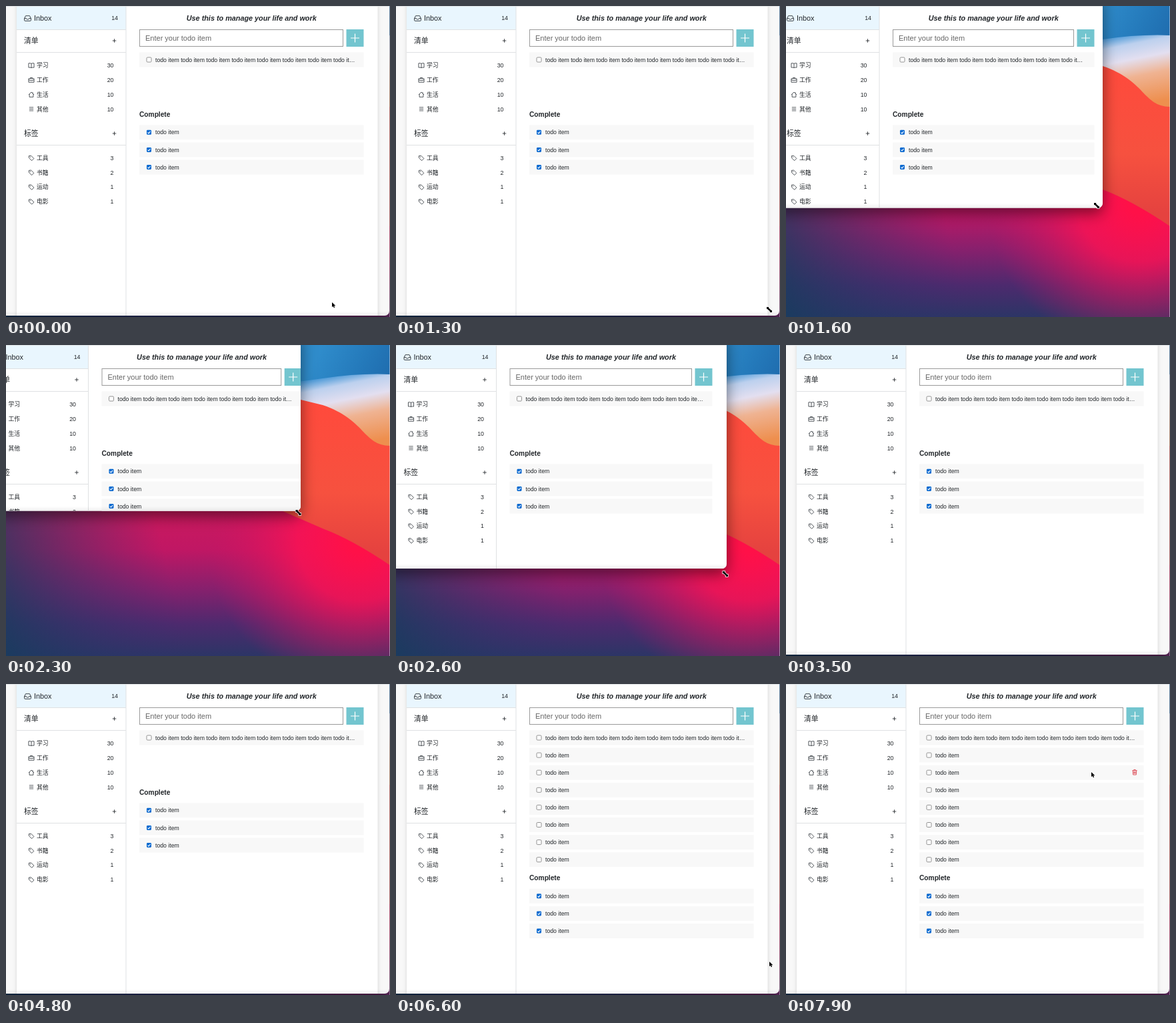
An HTML page with a canvas for the animation above (8000 ms loop, 576 by 466 pixels).

```html
<!DOCTYPE html>
<html lang="zh-CN">
<head>
<meta charset="utf-8">
<title>Todo window</title>
<style>
  html, body { margin: 0; width: 100%; height: 100%; overflow: hidden; }
  canvas { display: block; }
</style>
</head>
<body>
<canvas id="stage" width="576" height="466"></canvas>
<script>
const g = document.getElementById('stage').getContext('2d');
const LOOP = 8000, INK = '#212529', LINE = '#dfe1e3';
const FONT = '"Liberation Sans", "Noto Sans CJK SC", "Noto Sans CJK", sans-serif';
const PITCH = 26.1;

// time, window right edge, window bottom edge
const windowKeys = [
  [0, 575, 464], [1300, 575, 464], [1400, 556, 434], [1600, 475, 302.5],
  [1900, 438, 243], [2200, 432, 233], [2400, 452, 264], [2600, 496, 335],
  [2900, 552, 427], [3200, 575, 464]
];
// time, pointer x, pointer y
const pointerKeys = [
  [0, 489, 444], [100, 489, 444], [500, 566, 460], [900, 560, 455], [1300, 560, 455],
  [1400, 543, 428], [1600, 466, 299], [1900, 430, 241], [2200, 427, 232],
  [2400, 450, 270], [2600, 494, 343], [2900, 556, 442], [3200, 600, 490],
  [6500, 620, 470], [6600, 560, 416], [6700, 449, 345], [6800, 460, 314],
  [6900, 460, 314], [7600, 459, 171], [7700, 459, 171], [7800, 458, 150], [7900, 458, 132]
];

const icons = {
  inbox: 'M.5 5.5 2.3 2h5.4l1.8 3.5V8q0 1-1 1h-7q-1 0-1-1ZM.5 5.5h2.6q.4 1.5 1.9 1.5t1.9-1.5h2.6',
  book: 'M5 2Q3 .9.5 1.5v7Q3 8 5 9q2-1 4.500-.5v-7Q7 .9 5 2v7',
  work: 'M.5 2.800h9v6h-9ZM3.300 2.800V1.300h3.400v1.500M.5 5Q5 7.200 9.500 5',
  home: 'M.5 5.500 5 1l4.500 4.500M1.800 4.500V9.200h6.400V4.500M7.300 3.300v-2',
  more: 'M1.500 2.200h7M1.500 5h7M1.500 7.800h7',
  tag: 'M1 1.500v3.300l4.700 4.700 3.600-3.600L4.600 1.200ZM3 3.200h.5v.5H3Z',
  trash: 'M.8 2h8.400M3.500 2V.7h3V2M1.800 2l.5 7.500h5.400L8.200 2M3.800 3.700v4M5 3.700v4M6.200 3.700v4',
  plus: 'M5 0v10M0 5h10',
  check: 'M2 5.300 4.200 7.500 8.200 2.700',
  arrow: 'M0 0v10.500L2.500 8.300l1.600 3.500 1.800-.8-1.500-3.400h3.300Z',
  resize: 'M0 0h4.500L3.400 1.100l5.500 5.500L10 5.500V10H5.500l1.100-1.100L1.100 3.400 0 4.500Z'
};
for (const name in icons) icons[name] = new Path2D(icons[name]);

function track(keys, t) {
  const i = keys.findIndex(k => k[0] > t);
  if (i < 0) return keys[keys.length - 1].slice(1);
  const a = keys[i - 1], b = keys[i], p = (t - a[0]) / (b[0] - a[0]);
  return a.slice(1).map((v, n) => v + (b[n + 1] - v) * p);
}

function box(x, y, w, h, color) {
  g.fillStyle = color;
  g.fillRect(x, y, w, h);
}

function text(str, x, cy, size, { style = '', align = 'left', color = INK } = {}) {
  g.font = `${style} ${size}px ${FONT}`;
  g.textAlign = align;
  g.fillStyle = color;
  g.fillText(str, x, cy + size * 0.36);
}

function icon(name, cx, cy, size, color = '#343a40', weight = 0.85) {
  const s = size / 10;
  g.save();
  g.translate(cx - size / 2, cy - size / 2);
  g.scale(s, s);
  g.strokeStyle = color;
  g.lineWidth = weight / s;
  g.stroke(icons[name]);
  g.restore();
}

function gradient(grad, ...stops) {
  stops.forEach(([at, color]) => grad.addColorStop(at, color));
  return grad;
}

function shape(d, fill) {
  g.fillStyle = fill;
  g.fill(new Path2D(d));
}

function wallpaper() {
  box(0, 0, 576, 466, gradient(g.createLinearGradient(0, 200, 0, 466),
    [0, '#d51b58'], [0.4, '#c01764'], [0.62, '#87206d'], [0.82, '#4d2a6e'], [1, '#2c3566']));
  box(0, 0, 576, 466, gradient(g.createLinearGradient(0, 466, 260, 400),
    [0, 'rgba(24,60,94,.85)'], [1, 'rgba(50,50,110,0)']));
  box(0, 0, 576, 466, gradient(g.createRadialGradient(530, 290, 20, 530, 290, 230),
    [0, '#ff1048'], [0.35, 'rgba(250,18,84,.85)'], [1, 'rgba(200,20,100,0)']));
  shape('M360 0H576V330Q520 292 475 275L360 225Z',
    gradient(g.createLinearGradient(0, 90, 0, 310), [0, '#ff4a3c'], [0.6, '#f6513f'], [1, '#e5423f']));
  shape('M360 0H576V151C535 150 540 112 475 90L360 62Z',
    gradient(g.createLinearGradient(490, 0, 520, 150),
      [0, '#2580c2'], [0.3, '#4f9bd8'], [0.4, '#bcd0ee'], [0.55, '#e3dff0'], [0.72, '#efb392'], [1, '#ee8f4e']));
  shape('M360 0H576V44Q530 42 475 50L360 66Z',
    gradient(g.createLinearGradient(475, 0, 576, 50), [0, '#2f8ccb'], [0.6, '#2479ba'], [1, '#1f6cae']));
  box(575, 0, 1, 466, 'rgba(230,230,240,.5)');
}

function todoRow(x, cy, width, label, done, hovered) {
  box(x, cy - 11, width, 22, '#f8f8f8');
  g.beginPath();
  g.roundRect(x + 11, cy - 3.5, 7, 7, 1.4);
  if (done) {
    g.fillStyle = '#0b6ad0';
    g.fill();
    icon('check', x + 14.5, cy, 6.5, '#fff', 1.1);
  } else {
    g.fillStyle = '#fff';
    g.fill();
    g.strokeStyle = '#777';
    g.lineWidth = 0.8;
    g.stroke();
  }
  text(label, x + 24, cy, 8.7);
  if (hovered) icon('trash', x + width - 13.5, cy - 0.5, 8.5, '#dc4550', 0.9);
}

function ellipsize(str, max) {
  g.font = `8.7px ${FONT}`;
  if (g.measureText(str).width <= max) return str;
  while (g.measureText(str + '…').width > max) str = str.slice(0, -1);
  return str + '…';
}

function sidebar(left, right) {
  const entry = (name, label, count, cy) => {
    icon(name, left + 22, cy, 9);
    text(label, left + 30, cy, 8.8);
    text(count, right - 18.5, cy, 8.8, { align: 'right' });
  };
  const heading = (label, cy) => {
    text(label, left + 11, cy, 10.8);
    icon('plus', right - 17.5, cy, 5.5, INK);
    box(left, cy + 17, right - left, 1, LINE);
  };
  box(left, 0, right - left, 35, '#e9f6fe');
  box(left, 35, right - left, 1, LINE);
  icon('inbox', left + 16.5, 18, 11, INK);
  text('Inbox', left + 26, 18, 10.8);
  text('14', right - 12, 18, 8.8, { align: 'right' });
  heading('清单', 52);
  [['book', '学习', 30], ['work', '工作', 20], ['home', '生活', 10], ['more', '其他', 10]]
    .forEach(([name, label, count], i) => entry(name, label, count, 89 + i * 21.8));
  heading('标签', 191);
  [['工具', 3], ['书籍', 2], ['运动', 1], ['电影', 1]]
    .forEach(([label, count], i) => entry('tag', label, count, 227.7 + i * 21.8));
  box(right - 0.5, 0, 1, 466, LINE);
}

function content(x, width, openCount, pointer) {
  const right = x + width;
  const row = (cy, label, done) => todoRow(x, cy, width, label, done,
    pointer && pointer[0] > x && pointer[0] < right && Math.abs(pointer[1] - cy) < 11);

  text('Use this to manage your life and work', x + width / 2, 18, 10.83,
    { style: 'italic bold', align: 'center' });
  g.strokeStyle = '#9a9a9a';
  g.lineWidth = 1;
  g.strokeRect(x + 0.5, 35.5, width - 31.5, 25);
  text('Enter your todo item', x + 9, 48, 11, { color: '#666' });
  box(right - 26, 35, 26, 26, '#73c5cf');
  icon('plus', right - 13, 48, 13, '#fff', 1.2);

  const long = ellipsize(Array(12).fill('todo item').join(' '), width - 36.5);
  for (let i = 0; i < openCount; i++) row(80.5 + i * PITCH, i ? 'todo item' : long, false);
  const titleY = Math.max(162, 80.5 + (openCount - 1) * PITCH + 27.3);
  text('Complete', x, titleY, 10.2, { style: 'bold' });
  for (let i = 0; i < 3; i++) row(titleY + 27.3 + i * PITCH, 'todo item', true);
}

function appWindow(w, h, openCount, pointer) {
  const wide = w > 558;
  const left = wide ? 16 + (w - 575) / 2 : -10 + (w - 475) / 2;
  const divider = left + (wide ? 164 : 150);
  const width = wide ? 336.5 : 302.5 + (w - 475) * 0.07;

  g.save();
  g.beginPath();
  g.roundRect(-20, -20, w + 20, h + 20, 7);
  g.save();
  g.shadowColor = 'rgba(0,0,0,.5)';
  g.shadowBlur = 22;
  g.shadowOffsetY = 8;
  g.fillStyle = '#f8f8f8';
  g.fill();
  g.restore();
  g.clip();
  g.save();
  g.shadowColor = 'rgba(0,0,0,.14)';
  g.shadowBlur = 5;
  box(left, -20, divider + width + 41 - left, 520, '#fff');
  g.restore();
  sidebar(left, divider);
  content(divider + 20, width, openCount, pointer);
  box(0, h - 7, w, 7, gradient(g.createLinearGradient(0, h - 7, 0, h),
    [0, 'rgba(0,0,0,0)'], [1, 'rgba(0,0,0,.06)']));
  box(0, 0, w, 1, '#dcdfe1');
  g.restore();
}

function drawPointer(name, x, y, scale) {
  g.save();
  g.translate(x, y);
  g.scale(scale, scale);
  g.lineJoin = 'round';
  g.lineWidth = 1.6;
  g.strokeStyle = '#fff';
  g.stroke(icons[name]);
  g.fillStyle = '#000';
  g.fill(icons[name]);
  g.restore();
}

function draw(time) {
  const t = Math.floor((time % LOOP) / 100) * 100;
  const [w, h] = track(windowKeys, t);
  const pointer = track(pointerKeys, t);
  const resizing = t >= 800 && t < 3200;
  const visible = t < 3200 || t >= 6600;
  wallpaper();
  appWindow(w, h, t < 6000 ? 1 : 8, visible && !resizing ? pointer : null);
  if (resizing) drawPointer('resize', pointer[0] - 4, pointer[1] - 4, 0.8);
  else if (visible) drawPointer('arrow', pointer[0], pointer[1], 0.7);
}

function loop() {
  draw(performance.now());
  requestAnimationFrame(loop);
}
loop();
</script>
</body>
</html>
```
